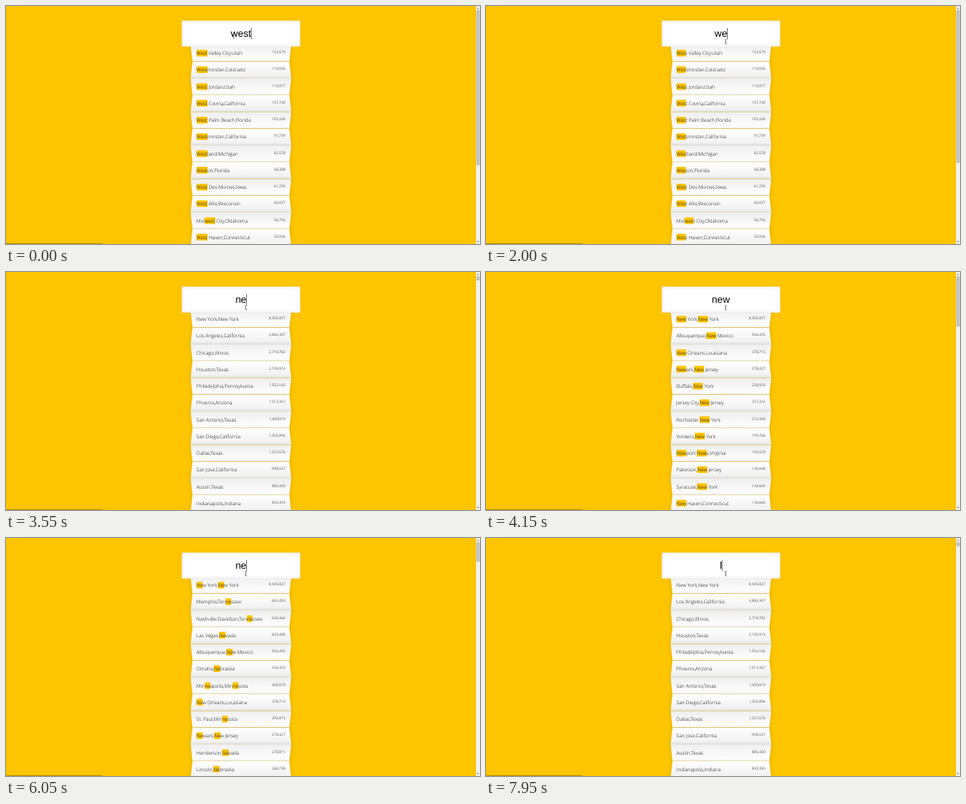
An HTML page for the animation above (8 s loop, 600 px wide and 302 px high).

```html
<!DOCTYPE html>
<html lang="en">
<head>
<meta charset="utf-8">
<title>City search</title>
<style>
  html, body { margin: 0; width: 100%; height: 100%; overflow: hidden; background: #fdc400; }
  * { box-sizing: border-box; }
  /* A 1920px wide desktop page, shown at 600px. */
  #page { position: absolute; width: 1920px; height: 967px; overflow: hidden;
    transform: scale(.3125); transform-origin: 0 0; background: #fdc400;
    text-rendering: geometricPrecision; }
  #search { position: absolute; left: 711.5px; top: 59px; width: 480px; height: 106px; z-index: 2;
    display: flex; align-items: center; justify-content: center; white-space: pre;
    font: 40px "Liberation Sans", Arial, sans-serif; background: #fff;
    border: 10px solid #f7f7f7; border-radius: 5px;
    box-shadow: 0 0 5px rgba(0,0,0,.12), inset 0 0 2px rgba(0,0,0,.19); }
  #search.empty { color: #757575; }
  #caret { width: 2px; height: 46px; margin-right: -2px; background: #222; }
  #list { position: absolute; left: 751.5px; top: 155px; width: 400px; margin: 0; padding: 0; list-style: none; }
  li { position: relative; display: flex; justify-content: space-between; height: 68px; padding: 22px 20px 0;
    white-space: pre; font: 300 20px/27px "Open Sans", "Noto Sans", sans-serif; color: #000;
    filter: drop-shadow(0 0 6px rgba(0,0,0,.14)); }
  /* Alternate rows tilt towards and away from the viewer, like folded paper. */
  li::before { content: ""; position: absolute; z-index: -1; left: -4px; top: 2.5px; width: 408px; height: 68px;
    border-bottom: 1px solid #d8d8d8; }
  li:nth-child(odd)::before { height: 67.7px; background: linear-gradient(to top, #fff, #efefef);
    clip-path: polygon(0 0, 100% 0, 400px 100%, 8px 100%); }
  li:nth-child(even)::before { background: linear-gradient(to bottom, #fff, #efefef);
    clip-path: polygon(8px 0, 400px 0, 100% 100%, 0 100%); }
  li:nth-child(odd) { padding-top: 23px; }
  mark { color: inherit; background: #fdc400; }
  small { font-size: 15px; line-height: 20px; }
  #bar { position: absolute; left: 1904px; top: 0; width: 16px; height: 967px; background: #f1f1f1; }
  #thumb { position: absolute; left: 1px; top: 17px; width: 14px; background: #c1c1c1; }
  #bar svg { position: absolute; left: 0; top: 0; }
  #pointer { position: absolute; left: 0; top: 0; z-index: 3; }
  #edge { position: absolute; left: 0; top: 964px; width: 390px; height: 3px; background: rgba(60,50,0,.5); }
</style>
</head>
<body>
<div id="page">
  <div id="search"><span id="text"></span><i id="caret"></i></div>
  <ul id="list"></ul>
  <div id="bar">
    <div id="thumb"></div>
    <svg width="16" height="967" fill="#505050"><path d="M4 11h8l-4-5zM4 954h8l-4 5z"/></svg>
  </div>
  <svg id="pointer" width="10" height="20" fill="none" stroke="#222" stroke-width="2">
    <path d="M1 1h3l1 1 1-1h3M5 2v16M1 19h3l1-1 1 1h3"/>
  </svg>
  <div id="edge"></div>
</div>
<script>
const LOOP = 8000, LIST_DELAY = 200, BLINK = 500, ROWS = 12;

const cities = `New York,New York 8,405,837
Los Angeles,California 3,884,307
Chicago,Illinois 2,718,782
Houston,Texas 2,195,914
Philadelphia,Pennsylvania 1,553,165
Phoenix,Arizona 1,513,367
San Antonio,Texas 1,409,019
San Diego,California 1,355,896
Dallas,Texas 1,257,676
San Jose,California 998,537
Austin,Texas 885,400
Indianapolis,Indiana 843,393
Jacksonville,Florida 842,583
Fort Worth,Texas 792,727
Memphis,Tennessee 653,450
Seattle,Washington 652,405
Washington,District Of Columbia 646,449
Nashville-Davidson,Tennessee 634,464
Las Vegas,Nevada 603,488
Milwaukee,Wisconsin 599,164
Albuquerque,New Mexico 556,495
Omaha,Nebraska 434,353
Minneapolis,Minnesota 400,070
Wichita,Kansas 386,552
New Orleans,Louisiana 378,715
Honolulu,Hawaii 347,884
St. Paul,Minnesota 294,873
Newark,New Jersey 278,427
Henderson,Nevada 270,811
Lincoln,Nebraska 268,738
Buffalo,New York 258,959
Jersey City,New Jersey 257,342
Rochester,New York 210,358
Yonkers,New York 199,766
Newport News,Virginia 182,020
Paterson,New Jersey 145,948
Syracuse,New York 144,669
West Valley City,Utah 133,579
New Haven,Connecticut 130,660
Westminster,Colorado 110,945
West Jordan,Utah 110,077
Lowell,Massachusetts 108,861
West Covina,California 107,740
West Palm Beach,Florida 102,436
Westminster,California 91,739
Westland,Michigan 82,578
Weston,Florida 68,388
West Des Moines,Iowa 61,255
West Allis,Wisconsin 60,697
Midwest City,Oklahoma 56,756
West Haven,Connecticut 55,046`.split('\n').map(line => {
  const gap = line.lastIndexOf(' ');
  return { name: line.slice(0, gap), people: line.slice(gap + 1) };
});

// Time of each keystroke and the text it leaves in the field.
const keys = [
  [0, 'west'], [1800, 'wes'], [2000, 'we'], [2200, 'w'], [2400, ''],
  [3400, 'n'], [3500, 'ne'], [3650, 'new'],
  [5600, 'ne'], [6200, 'n'], [6650, ''], [7850, 'l']
];
const thumbHeights = { west: 630, wes: 620, we: 470, w: 53, ne: 79, new: 205 };

const el = id => document.getElementById(id);
const lastKey = time => keys.findLast(([at]) => at <= time) || keys[0];

function showList(query) {
  const pattern = new RegExp(query, 'gi');
  const mark = name => query ? name.replace(pattern, '<mark>$&</mark>') : name;
  el('list').innerHTML = cities
    .filter(city => city.name.toLowerCase().includes(query))
    .slice(0, ROWS)
    .map(city => `<li><span>${mark(city.name)}</span><small>${city.people}</small></li>`)
    .join('');
  el('thumb').style.height = (thumbHeights[query] || 17) + 'px';
}

let shownQuery = null;

function draw(time) {
  const [typedAt, text] = lastKey(time);
  el('text').textContent = text || 'City or State';
  el('search').className = text ? '' : 'empty';
  const caretOn = text && (time - typedAt) % (2 * BLINK) < BLINK;
  el('caret').style.visibility = caretOn ? 'visible' : 'hidden';

  const query = lastKey(time - LIST_DELAY)[1];
  if (query !== shownQuery) showList(shownQuery = query);

  const p = Math.min(1, Math.max(0, (time - 250) / 600));
  const eased = p * p * (3 - 2 * p);
  el('pointer').style.transform = `translate(${917 + 49 * eased}px, ${113 + 22 * eased}px)`;
}

const start = performance.now();
function frame() {
  draw((performance.now() - start) % LOOP);
  requestAnimationFrame(frame);
}
frame();
</script>
</body>
</html>
```
